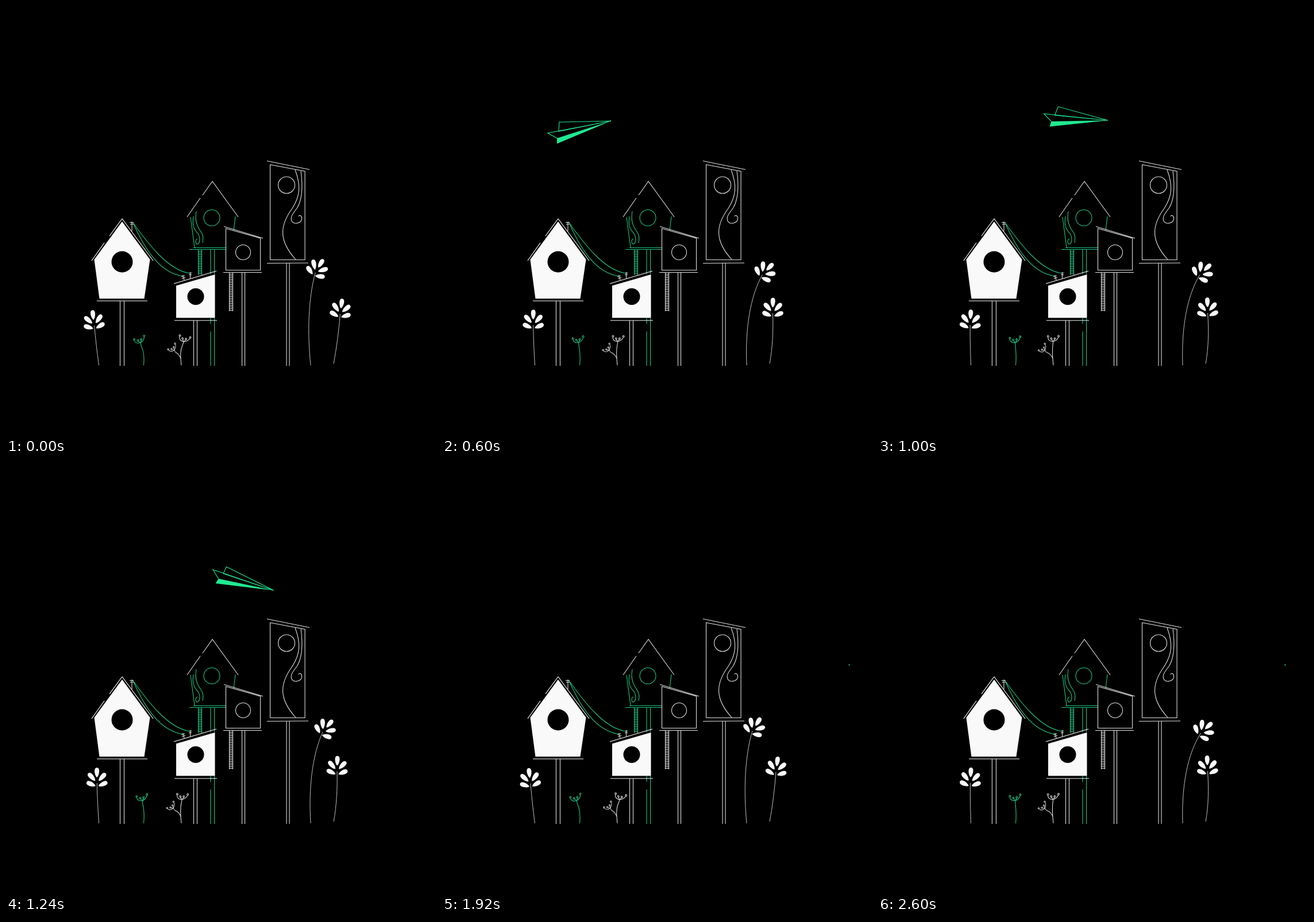
An HTML page with a canvas that plays this animation: 748 px wide and 748 px high, repeating every 2.64 s.

```html
<!DOCTYPE html>
<html lang="en">
<head>
<meta charset="utf-8">
<title>Birdhouses</title>
<style>
  html, body { margin: 0; width: 100%; height: 100%; overflow: hidden; background: #000; }
  canvas { display: block; }
</style>
</head>
<body>
<canvas id="stage" width="748" height="748"></canvas>
<script>
const ctx = document.getElementById('stage').getContext('2d');
const LOOP = 2640, HOLD = 120, STEP = 40;
const WHITE = '#f9f9f9', LINE = '#dedede', STEM = '#bcbcbc', GREEN = '#20c582', BRIGHT = '#20e991';
const GROUND = 626;

const mix = (a, b, k) => a + (b - a) * k;
const mixAll = (from, to, k) => from.map((v, i) => mix(v, to[i], k));
const clamp = v => Math.max(0, Math.min(1, v));

function stroke(d, color = LINE, width = 1.1) {
  ctx.strokeStyle = color;
  ctx.lineWidth = width;
  ctx.stroke(new Path2D(d));
}

function fill(d, color) {
  ctx.fillStyle = color;
  ctx.fill(new Path2D(d));
}

function circle(x, y, r, strokeColor, fillColor) {
  ctx.beginPath();
  ctx.arc(x, y, r, 0, Math.PI * 2);
  if (fillColor) { ctx.fillStyle = fillColor; ctx.fill(); }
  if (strokeColor) { ctx.strokeStyle = strokeColor; ctx.lineWidth = 1.1; ctx.stroke(); }
}

function posts(x1, x2, top, bottom = GROUND, color = LINE) {
  stroke(`M${x1} ${top}V${bottom}M${x2} ${top}V${bottom}`, color);
}

function ladder(x, top, bottom, color) {
  posts(x, x + 6, top, bottom, color);
  for (let y = top + 2.5; y < bottom; y += 3) stroke(`M${x} ${y}h6`, color, 1);
}

function greenHouse() {
  stroke('M315 367L338 334M342 329L359 305L404 367');
  stroke('M321 367L328 420M326 420.5H382M319 423.5H382M399 366L396 391', GREEN);
  circle(358, 368.5, 14, GREEN);
  stroke('M331 357C327 380 337 388 341 396C344 402 343 407 342 412' +
         'M326 366C323 384 329 390 334 396C338 402 338 413 333 414C329 414 329 406 333 405', GREEN);
  ladder(334.5, 424, 468, GREEN);
  posts(356, 362.5, 424, 466, GREEN);
  stroke('M356 543V553M356 566V626M362.5 543V626', GREEN);
}

function tallHouse() {
  stroke('M459.5 276L520 287.5V441.5H459.5ZM454 269.5L528 284.5M454 447.5L526 447');
  circle(488, 311.5, 14.5, LINE);
  stroke('M503 285C513 312 512 330 498 352C476 382 474 408 504 441' +
         'M513 287C517 318 515 338 506 352C499 361 494 367 497 374' +
         'C501 381 515 378 514.5 369C514 364 510 363 509 366');
  posts(488, 493, 447);
}

function slantHouse() {
  fill('M382 387L442 404V460H382Z', '#000');
  stroke('M382.5 387L442.5 404V459.5H382.5ZM379 383.5L447 404M378 463.5H445');
  circle(412.5, 428.5, 13, LINE);
  posts(410.5, 415.5, 464);
  ladder(388.5, 464, 531, LINE);
}

function smallWhiteHouse() {
  fill('M296 486.5L363.5 467V542.5H296Z', WHITE);
  circle(330, 505.5, 14.5, null, '#000');
  stroke('M292 483L366 461M293 547H367', WHITE, 1.2);
  posts(326.5, 332.5, 547);
  stroke('M310 477L307.5 468M305 471L311 469M306 474L312 472M320.5 463V474M318 464.5H323M318 467.5H323');
}

function bigWhiteHouse() {
  fill('M202 375L250.5 441L240.5 509H162.5L153.5 441Z', WHITE);
  circle(202, 445, 18.5, null, '#000');
  stroke('M149 443L171 412M180 400L202 370M202 370L256 443M158 513H246', WHITE, 1.2);
  posts(198.5, 205.5, 513);
  stroke('M219 375V392M215 376.5H222M216 379.5H222');
  stroke('M221 377C240 420 266 464 308 470M221 377C246 412 282 460 320 465', GREEN);
}

function placed(x, y, degrees, scale, draw) {
  ctx.save();
  ctx.translate(x, y);
  ctx.rotate(degrees * Math.PI / 180);
  ctx.scale(scale, scale);
  draw();
  ctx.restore();
}

function leaf(x, y, angle, length) {
  placed(x, y, angle, 1, () => {
    fill(`M0 0C-4 ${-length * 0.2} -6.5 ${-length} 0 ${-length}` +
         `C6.5 ${-length} 4 ${-length * 0.2} 0 0Z`, WHITE);
  });
}

// Pose: two stem control points, head centre and head rotation.
function blossom(baseX, baseY, left, right, sway) {
  const [ax, ay, bx, by, x, y, turn] = mixAll(left, right, sway);
  const lean = turn * Math.PI / 180;
  const topX = x - Math.sin(lean) * 8, topY = y + Math.cos(lean) * 8;
  stroke(`M${baseX} ${baseY}C${ax} ${ay} ${bx} ${by} ${topX} ${topY}`, STEM, 1);
  placed(x, y, turn, 1, () => {
    leaf(0, -2, 0, 17);
    for (const side of [-1, 1]) {
      leaf(side * 3, 4, side * 42, 18);
      leaf(side * 2.5, 13, side * 66, 17);
    }
  });
}

function umbel(x, y, turn, scale, color) {
  placed(x, y, turn, scale, () => {
    stroke('M0 0V-5M-10 -11C-8 -3 4 -3 8 -14M0 -5L-3.5 -9M0 -5L2 -10', color);
    for (const [dx, dy] of [[-10, -13], [-4, -10], [2, -11], [8, -16]]) circle(dx, dy, 1.4, color);
  });
}

function sprigs(sway) {
  const gx = mix(235, 239, sway);
  stroke(`M239.5 625C241 610 240 600 ${gx} 591`, GREEN);
  umbel(gx, 591, mix(-10, 2, sway), 1, GREEN);

  const rx = mix(307.5, 304, sway), lx = mix(295, 293, sway);
  stroke(`M305 625C303 607 303 598 ${rx} 589M304.5 614C302 608 299 604 ${lx} 602.5`);
  umbel(rx, 589, mix(20, 7, sway), 1, LINE);
  umbel(lx, 602.5, mix(-30, -38, sway), 0.85, LINE);
}

// Flight keys: step, nose x, nose y, rotation in degrees.
const FLIGHT = [
  [0, 52, 312, -26], [4, 110, 262, -19], [13, 294, 200, 0], [23, 400, 199, 16.7],
  [29, 466, 220, 29.7], [38, 643, 302, 43.5], [42, 708, 349, 48]
];

function slope(i, c) {
  const a = FLIGHT[Math.max(0, i - 1)], b = FLIGHT[Math.min(FLIGHT.length - 1, i + 1)];
  return (b[c] - a[c]) / (b[0] - a[0]);
}

function flightAt(step, c) {
  let i = 0;
  while (i < FLIGHT.length - 2 && step >= FLIGHT[i + 1][0]) i++;
  const a = FLIGHT[i], b = FLIGHT[i + 1], span = b[0] - a[0];
  const u = (step - a[0]) / span, v = 1 - u;
  return v * v * (1 + 2 * u) * a[c] + u * u * (3 - 2 * u) * b[c] +
         span * u * v * (v * slope(i, c) - u * slope(i + 1, c));
}

function plane(step) {
  if (step < 1) return;
  if (step >= 42) return circle(708.3, 349.5, 1.1, null, BRIGHT);
  const scale = Math.min(clamp(step / 6), clamp((42 - step) / 4));
  const [x, y, turn] = [1, 2, 3].map(c => flightAt(step, c));
  // The far wing folds in during the descent.
  const fold = clamp((step - 23) / 15);
  const wing = `${-90 - 5.5 * fold} ${2 + 7.5 * fold}`;
  placed(x, y, turn, scale, () => {
    stroke(`M-94 30L-110 21L0 0L-91 18L${wing}L0 0`, BRIGHT, 1.1 / scale);
    fill('M0 0L-94 30V39.5Z', BRIGHT);
  });
}

const swayAt = (step, rest) => (1 - Math.cos((step - rest) / 44 * Math.PI * 2)) / 2;

function render(time) {
  const step = time < HOLD ? 0 : Math.floor((time - HOLD) / STEP) + 1;
  const tall = swayAt(step, -3), low = swayAt(step, -1.5);
  ctx.fillStyle = '#000';
  ctx.fillRect(0, 0, 748, 748);
  greenHouse();
  tallHouse();
  slantHouse();
  smallWhiteHouse();
  bigWhiteHouse();
  blossom(161.5, 625, [158, 600, 156, 580, 152.5, 548, -7], [161, 600, 160, 580, 161, 547, 3], low);
  blossom(530, 625, [524, 570, 525, 510, 541, 456.5, 30], [528, 560, 538, 505, 567.5, 462.5, 47], tall);
  blossom(570, 622, [575, 595, 579, 565, 582.5, 528, 8], [575, 595, 575.5, 565, 573, 526, -2], low);
  sprigs(low);
  plane(step);
}

const start = performance.now();
function tick() {
  render((performance.now() - start) % LOOP);
  requestAnimationFrame(tick);
}
tick();
</script>
</body>
</html>
```
